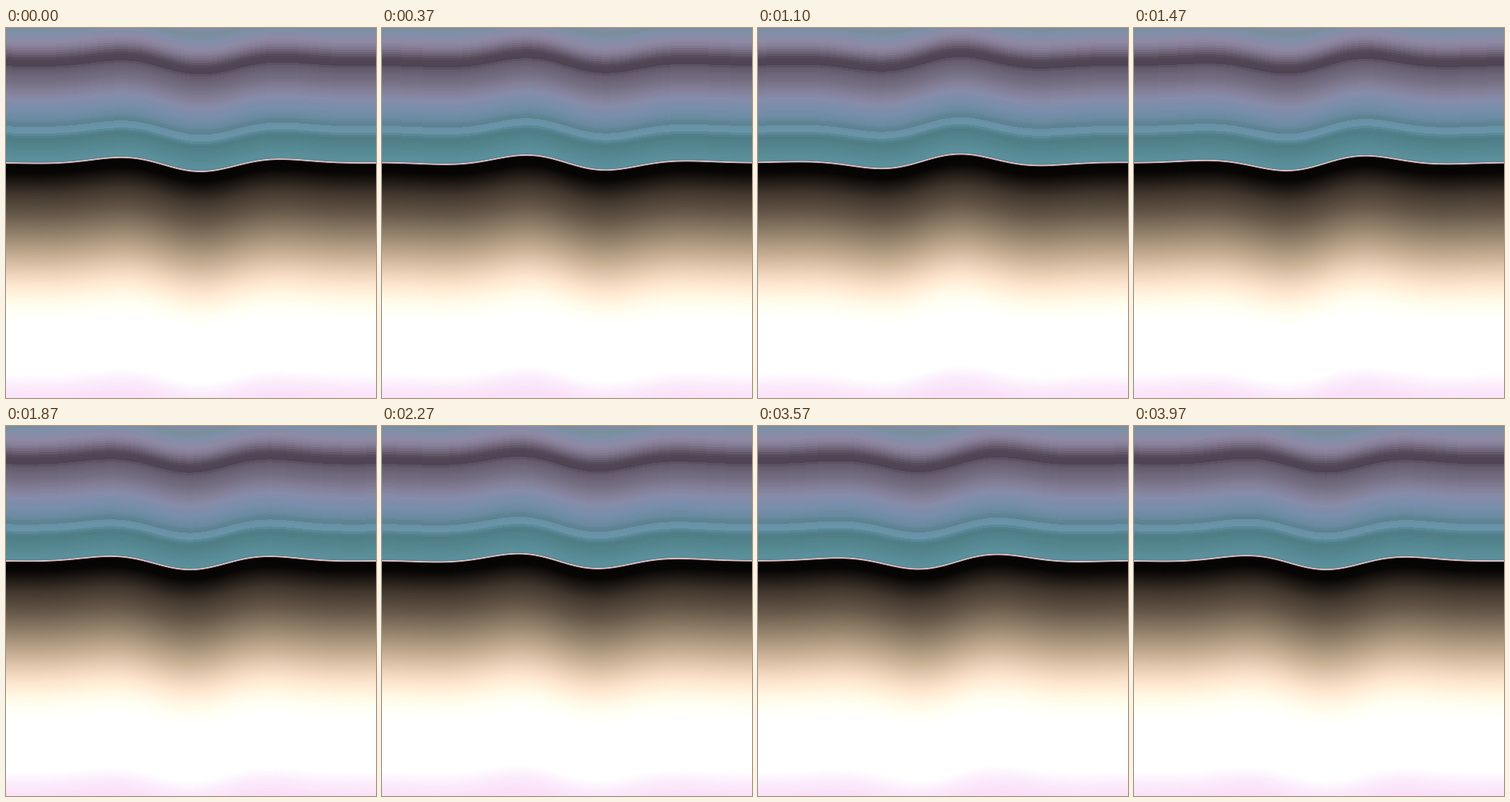
Animation, 480 px wide and 480 px high, one loop 4.01 s. Source, as an HTML page with a canvas:

```html
<!DOCTYPE html>
<html lang="en">
<head>
<meta charset="utf-8">
<title>Wave</title>
<style>
  html, body { margin: 0; width: 100%; height: 100%; overflow: hidden; background: #fff; }
  canvas { display: block; width: 100vw; height: 100vh; }
</style>
</head>
<body>
<canvas id="stage" width="480" height="480"></canvas>
<script>
const SIZE = 480, LOOP = 4010, FRAMES = 120;
const WAVELENGTH = 240, AMPLITUDE = 11.6, CENTER = 238, SPREAD = 92, CREST = 255;
const TOP = -20, BOTTOM = 500, BAND = 3, BANDED_TO = 172;

// Colours down the resting picture: [y, colour]
const profile = [
  [-20, '#828ca8'], [-10, '#808ca6'], [-1, '#7a8e9b'], [5, '#7f8fa8'], [17, '#8e8aa5'],
  [25, '#857c95'], [33, '#6c6173'], [40, '#504656'], [48, '#4e4453'], [52, '#625a6b'],
  [60, '#6d6577'], [70, '#767084'], [82, '#848098'], [92, '#878ca9'], [105, '#788eab'],
  [115, '#6e8ca4'], [121, '#64879b'], [125, '#58808c'], [128, '#6990a4'], [134, '#6a95ab'],
  [138, '#588794'], [142, '#507c84'], [155, '#548690'], [172, '#5c919c'],
  [173.4, '#5a7f92'], [174.2, '#e4cbd2'], [175.1, '#d9b9b8'], [175.9, '#2a1713'], [177, '#060403'],
  [188, '#080605'], [200, '#221b16'], [215, '#41372e'], [240, '#645648'], [260, '#877661'],
  [280, '#ab967e'], [300, '#cfb69b'], [320, '#f0d5bd'], [335, '#ffe8d2'], [350, '#fff8e4'],
  [365, '#fffff5'], [380, '#ffffff'], [448, '#ffffff'], [465, '#fbebfb'], [480, '#fae1f8'], [500, '#f8dcf7']
];

const ctx = document.getElementById('stage').getContext('2d');
const channels = hex => [1, 3, 5].map(i => parseInt(hex.slice(i, i + 2), 16));

function colorAt(y) {
  const next = Math.max(1, profile.findIndex(([stop]) => stop >= y));
  const [y0, from] = profile[next - 1], [y1, to] = profile[next];
  const share = (y - y0) / (y1 - y0), end = channels(to);
  return `rgb(${channels(from).map((c, i) => Math.round(c + (end[i] - c) * share))})`;
}

function makeGradient() {
  const gradient = ctx.createLinearGradient(0, TOP, 0, BOTTOM);
  const add = (y, color) => gradient.addColorStop((y - TOP) / (BOTTOM - TOP), color);
  for (let y = TOP; y < BANDED_TO; y += BAND) {
    const end = Math.min(y + BAND, BANDED_TO);
    const color = colorAt((y + end) / 2);
    add(y, color);
    add(end, color);
  }
  profile.filter(([y]) => y >= BANDED_TO).forEach(([y, color]) => add(y, color));
  return gradient;
}

function offsetAt(x, cycles) {
  const envelope = Math.exp(-(((x - CENTER) / SPREAD) ** 2) / 2);
  return AMPLITUDE * envelope * Math.cos(2 * Math.PI * ((x - CREST) / WAVELENGTH - cycles));
}

function draw(time) {
  const ticks = Math.floor((time % LOOP) / 10);
  const frame = Math.min(FRAMES - 1, Math.floor((ticks + 0.5) * 0.3));
  for (let x = 0; x < SIZE; x++) {
    ctx.setTransform(1, 0, 0, 1, 0, offsetAt(x + 0.5, 2 * frame / FRAMES));
    ctx.fillRect(x, TOP, 1, BOTTOM - TOP);
  }
}

ctx.fillStyle = makeGradient();
const start = performance.now();
function tick() {
  draw(performance.now() - start);
  requestAnimationFrame(tick);
}
tick();
</script>
</body>
</html>
```
